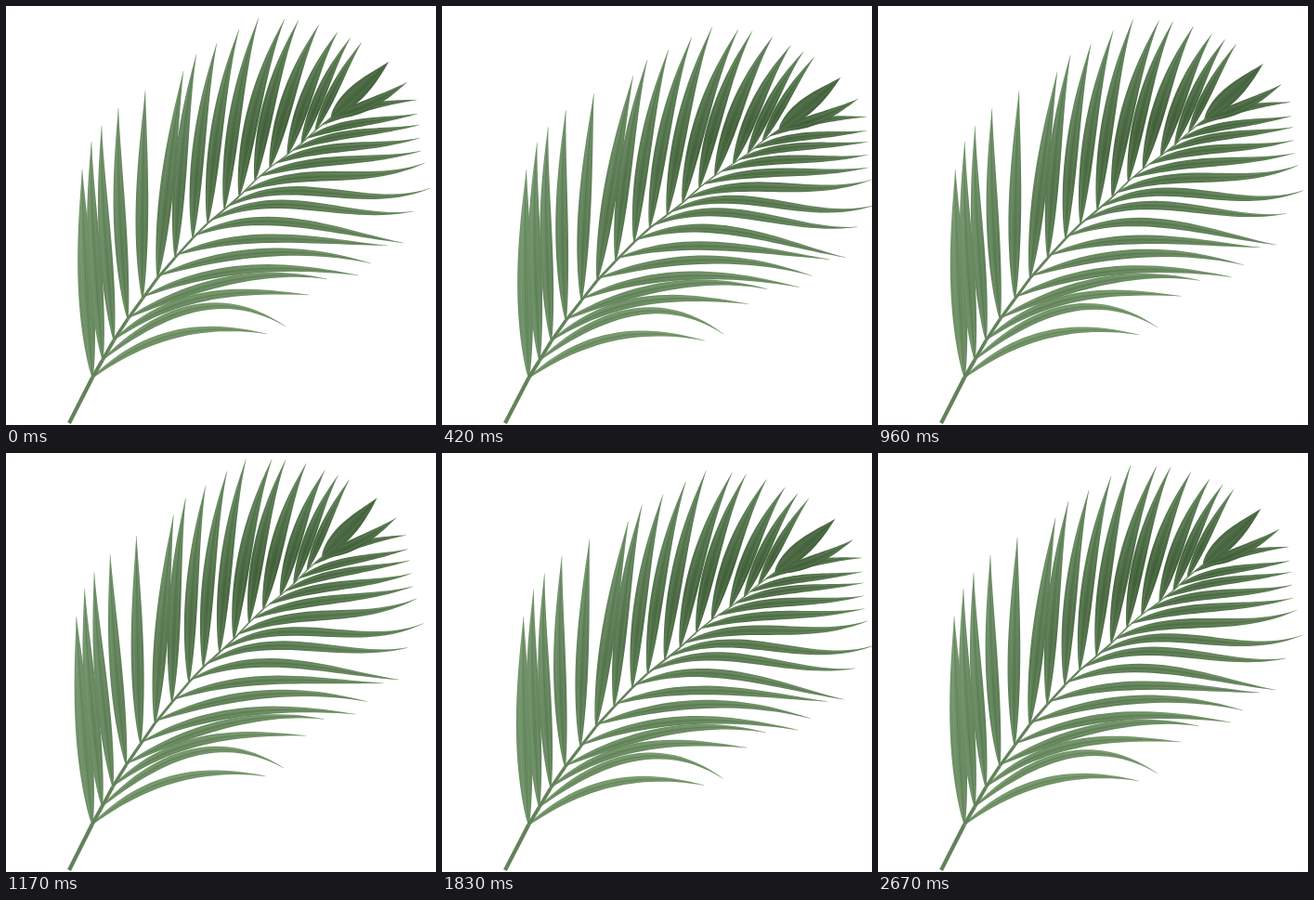
An HTML page with a canvas that plays this animation: 463x451 px, repeating every 2700 ms.

```html
<!DOCTYPE html>
<html lang="en">
<head>
<meta charset="utf-8">
<title>Palm frond</title>
<style>
  html, body { margin: 0; width: 100%; height: 100%; overflow: hidden; background: #fff; }
  canvas { display: block; }
</style>
</head>
<body>
<canvas id="stage" width="463" height="451"></canvas>
<script>
const ctx = document.getElementById('stage').getContext('2d');
const LOOP = 2700, STEP = 30;
const PIVOT = [80, 412];

// Sway keys: time in ms, amount of bend; eased in and out between keys.
const SWAY = [[0, 0], [600, 1.27], [1300, -0.9], [1930, 0.76], [2700, 0]];

// Points along the stem where the leaflets grow.
const NODES = [
  [93, 400], [104, 381], [116, 360], [131, 337], [147, 315], [163, 293],
  [182, 271], [201, 250], [217, 234], [235, 219], [251, 205], [268, 188],
  [284, 174], [303, 160], [318, 148], [333, 134], [350, 120]
];

// Leaflets: tip x, tip y, bow near the base, bow near the tip, width.
const UPPER = [
  [82, 176, 3, 3, 16], [92, 146, 3, 6, 14], [103, 129, 3, 6, 13],
  [121, 110, 5, 5, 13], [150, 91, 3, 2, 13], [191, 70, 2, 4, 14],
  [205, 52, 4, 8, 13], [227, 40, 6, 9, 13], [251, 25, 6, 11, 13],
  [272, 13, 6, 11, 13], [300, 14, 8, 13, 14], [315, 15, 7, 12, 13],
  [337, 20, 5, 11, 14], [357, 28, 4, 10, 13], [371, 34, 3, 8, 11],
  [383, 39, 3, 5, 9], [412, 60, 2, -2, 17]
];
const LOWER = [
  [281, 353, 37, 28, 8], [301, 345, 45, 54, 8], [326, 311, 40, 22, 9],
  [346, 294, 23, 27, 9], [380, 290, 28, 20, 9], [393, 277, 24, 24, 9],
  [411, 258, 25, 8, 9], [428, 255, 36, 9, 9], [439, 221, 36, -9, 9],
  [457, 196, 33, -21, 9], [451, 169, 20, -16, 10], [447, 156, 14, -5, 9],
  [446, 142, 14, -4, 9], [445, 128, 12, 0, 8], [443, 116, 10, 0, 8],
  [442, 101, 10, 6, 7], [432, 82, -6, -6, 11]
];

const lerp = (a, b, k) => a + (b - a) * k;
const mix = (a, b, k) => a.map((v, i) => lerp(v, b[i], k));
const css = c => `rgb(${c.map(Math.round).join()})`;
const smooth = u => u * u * (3 - 2 * u);

function bezier(p, t) {
  const u = 1 - t, k = [u * u * u, 3 * u * u * t, 3 * u * t * t, t * t * t];
  return [0, 1].map(a => p.reduce((s, q, i) => s + q[a] * k[i], 0));
}

// Samples a leaflet's spine with its normals and half widths.
function leaflet(base, [tx, ty, b1, b2, width], dir, tones) {
  const tip = [tx, ty];
  const bowed = (k, b) => mix(base, tip, k).map((v, a) => v + dir[a] * b);
  const pts = [base, bowed(1 / 3, b1), bowed(2 / 3, b2), tip];
  const spine = [];
  const n = 26;
  for (let i = 0; i <= n; i++) {
    const t = i / n, [x, y] = bezier(pts, t);
    const [ax, ay] = bezier(pts, t - 0.01), [bx, by] = bezier(pts, t + 0.01);
    const len = Math.hypot(bx - ax, by - ay);
    const half = width / 2 * Math.sin(Math.PI * t ** 0.78) + 0.5 * (1 - t);
    spine.push({ x, y, nx: (ay - by) / len * half, ny: (bx - ax) / len * half });
  }
  return { base, tip, spine, tones };
}

function grow() {
  const leaves = [], last = NODES.length - 1;
  NODES.forEach((node, i) => {
    const k = i / last, next = NODES[Math.min(i + 1, last)];
    const low = mix(node, next, 0.03 * i);
    leaves.push(leaflet(low, LOWER[i], [0, -1], [
      mix([116, 149, 106], [70, 101, 63], k),
      mix([124, 156, 113], [88, 119, 80], k)
    ]));
  });
  NODES.forEach((node, i) => {
    const k = Math.min(1, i / 11), top = i === last;
    leaves.push(leaflet(node, UPPER[i], [-1, 0], [
      top ? [76, 106, 68] : mix([110, 144, 103], [70, 100, 62], k),
      top ? [72, 102, 66] : mix([120, 153, 113], [104, 138, 98], k)
    ]));
  });
  return leaves;
}
const LEAVES = grow();

function sway(time) {
  const i = SWAY.findIndex(([t]) => t > time);
  const [t0, a] = SWAY[i - 1], [t1, b] = SWAY[i];
  return lerp(a, b, smooth((time - t0) / (t1 - t0)));
}

// Turns a point about the foot of the frond, more strongly further out.
function bender(amount) {
  return (x, y) => {
    if (y > PIVOT[1]) return [x, y];
    const dx = x - PIVOT[0], dy = y - PIVOT[1];
    const angle = amount * (0.026 + 0.00005 * Math.hypot(dx, dy));
    const c = Math.cos(angle), s = Math.sin(angle);
    return [PIVOT[0] + dx * c - dy * s, PIVOT[1] + dx * s + dy * c];
  };
}

function trace(points) {
  ctx.beginPath();
  points.forEach(p => ctx.lineTo(...p));
}

function drawLeaf({ base, tip, spine, tones }, bend) {
  const rail = side => spine.map(p => bend(p.x + p.nx * side, p.y + p.ny * side));
  const left = rail(-1), right = rail(1), mid = rail(0);
  const fill = ctx.createLinearGradient(...bend(...base), ...bend(...tip));
  fill.addColorStop(0, css(mix(tones[0], tones[1], 0.35)));
  fill.addColorStop(0.3, css(tones[0]));
  fill.addColorStop(1, css(tones[1]));
  ctx.fillStyle = fill;
  trace([...left, ...right.reverse()]);
  ctx.fill();

  ctx.fillStyle = 'rgba(40,70,35,.1)';
  trace([...mid, ...right]);
  ctx.fill();

  ctx.lineWidth = 0.8;
  [-0.5, 0, 0.5].forEach(side => {
    ctx.strokeStyle = side ? 'rgba(170,196,158,.2)' : 'rgba(45,75,40,.22)';
    trace(rail(side));
    ctx.stroke();
  });
}

function drawStem(bend) {
  const pts = [[68, 449], ...NODES].map(p => bend(...p));
  ctx.lineCap = 'butt';
  ctx.strokeStyle = '#63825a';
  for (let i = 1; i < pts.length; i++) {
    ctx.lineWidth = lerp(4.2, 1.2, Math.min(1, (i - 1) / 13));
    trace([pts[i - 1], pts[i]]);
    ctx.stroke();
  }
}

function draw(now) {
  const time = Math.floor(now % LOOP / STEP) * STEP;
  const bend = bender(sway(time));
  ctx.clearRect(0, 0, 463, 451);
  LEAVES.forEach(leaf => drawLeaf(leaf, bend));
  drawStem(bend);
}

let start;
function tick(now) {
  start ??= now;
  draw(now - start);
  requestAnimationFrame(tick);
}
draw(0);
requestAnimationFrame(tick);
</script>
</body>
</html>
```
